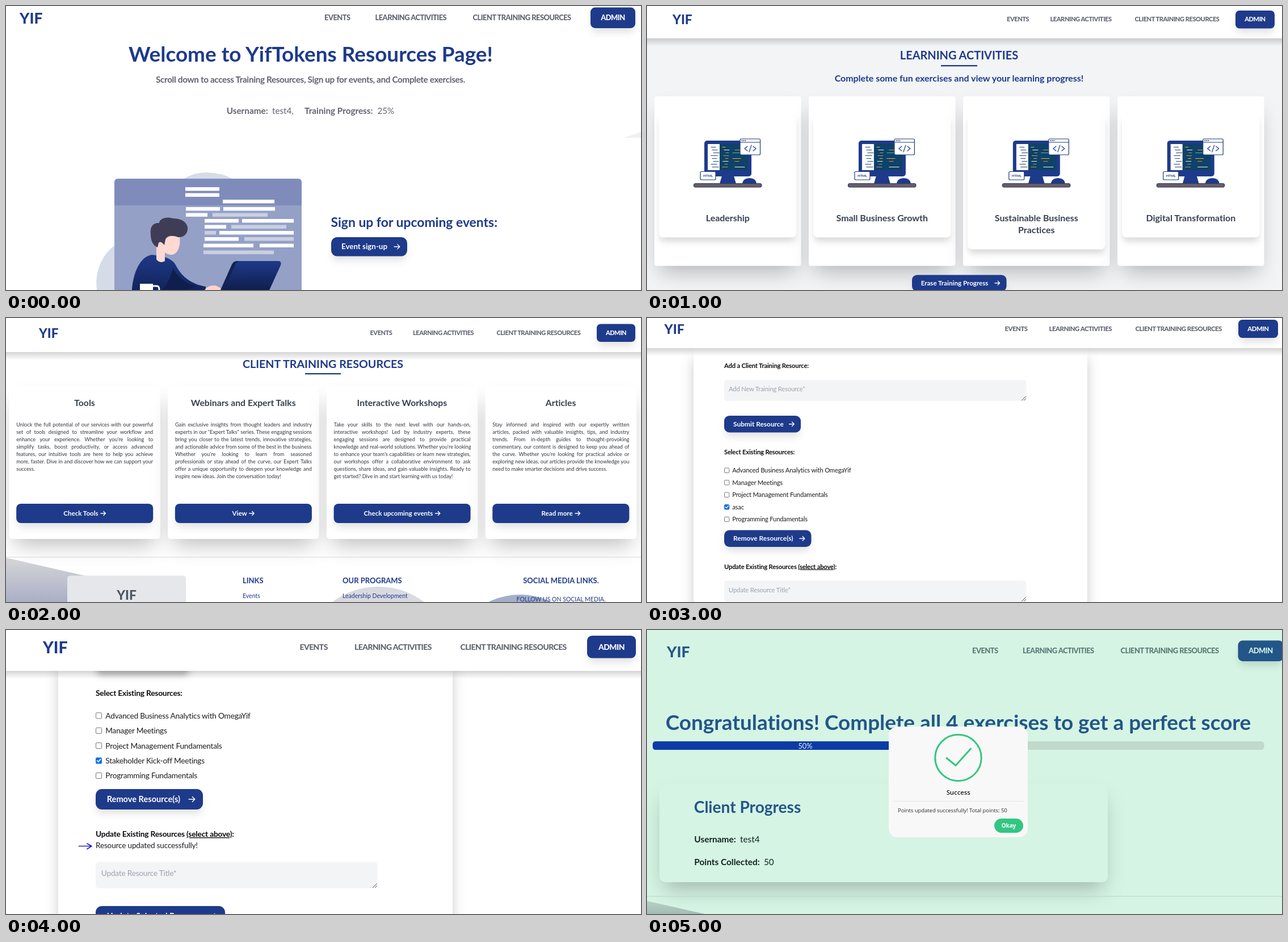
Recreate the animation shown at these times as an HTML page. Size 1119 px wide and 500 px high, loop 6 s.

```html
<!DOCTYPE html>
<html lang="en">
<head>
<meta charset="utf-8">
<title>Training portal tour</title>
<style>
html, body { margin: 0; width: 100%; height: 100%; overflow: hidden; background: #fff; }
svg { display: block; width: 100%; height: 100%; }
text, .copy { font-family: Lato, "Open Sans", sans-serif; font-variant-ligatures: none; }
.copy { color: #33363d; font-size: 9.2px; line-height: 13.07px; }
.copy div { white-space: nowrap; text-align: justify; text-align-last: justify; }
.copy div:last-child { text-align-last: left; }
</style>
</head>
<body>
<svg id="stage" viewBox="0 0 1119 500" preserveAspectRatio="none"></svg>
<script>
const NAVY = '#1e3a8a', GREY = '#60646f', INK = '#374151', BRAND = 'YIF', USER = 'test4';

const text = (x, y, str, size, o = {}) =>
  `<text x="${x}" y="${y}" font-size="${size}" font-weight="${o.w || 400}" fill="${o.fill || NAVY}"
    text-anchor="${o.mid ? 'middle' : 'start'}" letter-spacing="${(o.ls || 0) * size}"
    ${o.font ? `style="font-family:${o.font}"` : ''}>${str}</text>`;

const rect = (x, y, w, h, fill, r = 0, extra = '') =>
  `<rect x="${x}" y="${y}" width="${w}" height="${h}" rx="${r}" fill="${fill}" ${extra}/>`;

const path = (d, fill, extra = '') => `<path d="${d}" fill="${fill}" ${extra}/>`;

const line = (d, color, width, extra = '') =>
  path(d, 'none', `stroke="${color}" stroke-width="${width}" stroke-linecap="round" stroke-linejoin="round" ${extra}`);

const shadow = (x, y, w, h, dy, blur, inset, alpha) =>
  rect(x + inset, y + inset + dy, w - 2 * inset, h - 2 * inset, `rgba(0,0,0,${alpha})`, 6,
    `style="filter:blur(${blur}px)"`);

const box = (x, y, w, h, fill, r) => shadow(x, y, w, h, 20, 18, 9, 0.25) + rect(x, y, w, h, fill, r);

const arrow = (x, y, len, color = '#fff', width = 1.3) => {
  const h = len * 0.42;
  return line(`M${x} ${y}h${len}m${-h} ${-h}l${h} ${h}l${-h} ${h}`, color, width);
};

const pill = (x, y, w, h, r, fill = NAVY) =>
  shadow(x, y, w, h, 10, 7, 3, 0.12) + rect(x, y, w, h, fill, r);

// Button with a label on the left and an arrow after it
function button(x, y, w, h, label, size, arrowX) {
  return pill(x, y, w, h, h * 0.31) +
    text(x + size * 1.35, y + h / 2 + size * 0.35, label, size, { w: 700, fill: '#fff' }) +
    arrow(arrowX, y + h / 2, size * 0.74);
}

function nav({ size, y, xs, btn, logo, dark = NAVY, grey = GREY, label = '#fff' }) {
  const [bx, by, bw, bh] = btn;
  const style = { w: 800, fill: grey, ls: -0.04 };
  return text(logo[0], logo[1], BRAND, size * 2.05, { w: 800, fill: dark }) +
    ['EVENTS', 'LEARNING ACTIVITIES', 'CLIENT TRAINING RESOURCES']
      .map((s, i) => text(xs[i] - 0.5, y, s, size, style)).join('') +
    pill(bx, by, bw, bh, size * 0.63, dark) +
    text(bx + bw / 2, y, 'ADMIN', size, { ...style, fill: label, mid: true });
}

const header = (h, o) => rect(0, h, 1119, 14, 'url(#fade)') + rect(0, 0, 1119, h, '#fff') + nav(o);

function coder() {
  const bars = [
    [316, 319, 60], [316, 329.5, 60], [382, 341, 91], [317, 354, 60], [383, 354, 91],
    [317, 364.5, 38], [364, 364.5, 97, 1], [350, 375, 60], [416, 375, 91], [350, 385.5, 38],
    [397, 385.5, 97, 1], [350, 396, 20, 1], [376, 396, 131], [350, 407, 60], [420, 407, 87, 1],
    [348, 418.5, 88], [447, 418.5, 60], [348, 430.5, 124, 1]
  ];
  return path('M312 305Q330 293 354 293Q382 294 400 305ZM192 421C170 437 158 465 159.5 492L160 500H192Z', '#d6dbe8') +
    path('M191 500V311Q191 304 198 304H514Q521 304 521 311V500Z', '#94a0c6') +
    path('M191 351V311Q191 304 198 304H514Q521 304 521 311V351Z', '#7f8cbb') +
    bars.map(([x, y, w, dim]) => rect(x, y, w, 6.4, dim ? '#cad0e3' : '#fff')).join('') +
    path('M222 500C224 470 236 441 257 438C280 440 294 446 299 456C310 478 328 490 352 494V500Z', 'url(#shirt)') +
    path('M276 500Q290 482 294 462C306 482 320 490 336 493L318 500Z', '#0f1e4c') +
    path('M350 500Q356 491 368 492Q376 494 381 500Z', '#ffd3ca') +
    path('M279 408Q290 402 306 407C308 422 303 437 292 438Q285 438 280 434L280 449Q271 454 265 446L265 420Q272 412 279 420Z', '#ffd9d2') +
    path('M255 402C253 388 260 381 270 382C270 374 284 370 294 374C306 374 318 378 320 390C321 401 313 408 303 407C294 403 284 404 281 411L279 421Q272 412 269 417L267 425C258 421 255 412 255 402Z', '#3f3d56') +
    path('M378 500L398 455Q401 449 407 449H479Q486 449 484 456L464 500Z', '#122352') +
    path('M384 500L404 455Q407 449 412 449H479Q486 449 484 456L464 500Z', 'url(#lid)') +
    rect(236, 489, 23, 12, '#fff') + line('M259 493H266Q270 493 270 500', '#fff', 3);
}

function monitor() {
  const colors = ['#e3b04b', '#f4efe0', '#58b6a6', '#e58a4a'];
  let code = '';
  for (let i = 0; i < 8; i++) {
    const y = 248.5 + i * 5;
    code += line(`M${113 + (i % 3) * 2} ${y}h${8 + (i * 5) % 4}`, '#26466f', 1.2);
    code += line(`M${133 + (i * 3) % 7} ${y}h${5 + (i * 4) % 8}`, colors[i % 4], 1.2);
    if (i % 3) code += line(`M${151 + (i % 2) * 4} ${y}h${6 + (i * 5) % 12}`, colors[(i * 3) % 4], 1.2);
  }
  const edge = 'stroke="#1e3a7a" stroke-width="1.2"';
  return rect(101, 237, 83, 63, NAVY, 5) + rect(107, 243, 71, 46, '#0e4268') + rect(107, 243, 21, 46, '#fff') + code +
    path('M132 299H153L157 313H128Z', NAVY) +
    path('M168 313Q169 303 181 303Q192 303 193 313Z', NAVY) +
    rect(82.5, 312.5, 119.5, 6.5, '#6d5c60', 3.2, edge) +
    rect(164, 234, 35.5, 28, '#fff', 2, edge) + line('M164 240H199.5', NAVY, 1) +
    [167.5, 170.5, 173.5].map(x => `<circle cx="${x}" cy="237" r="1" fill="${NAVY}"/>`).join('') +
    line('M177 247l-5 4l5 4M187 247l5 4l-5 4M184 245l-4 12', NAVY, 1.2) +
    rect(94, 291.5, 27, 14.5, '#fff', 2, edge) +
    text(107.5, 301, 'HTML', 6, { w: 700, mid: true });
}

function welcome() {
  const b = { w: 700, fill: GREY }, r = { fill: GREY };
  return rect(0, 0, 1119, 500, '#fff') +
    nav({ size: 12.9, y: 24.6, xs: [561.5, 651, 823], btn: [1030, 2.5, 79, 36.5], logo: [24, 31] }) +
    text(537, 98, `Welcome to ${BRAND[0]}ifTokens Resources Page!`, 36.9, { w: 700, mid: true }) +
    text(536.5, 135, 'Scroll down to access Training Resources, Sign up for events, and Complete exercises.', 15.33,
      { ...b, mid: true, ls: -0.025 }) +
    text(388.7, 190, 'Username:', 15.3, b) + text(469, 190, USER + ',', 15.2, r) +
    text(526, 190, 'Training Progress:', 15.3, b) + text(654.5, 190, '25%', 15.2, r) +
    path('M1089 232L1119 222V232Z', '#f0f0f2') + coder() +
    text(572.5, 389, 'Sign up for upcoming events:', 22.9, { w: 700 }) +
    button(573, 407, 134, 33.5, 'Event sign-up', 13.35, 684);
}

function activities() {
  const names = [['Leadership'], ['Small Business Growth'], ['Sustainable Business', 'Practices'], ['Digital Transformation']];
  const cards = names.map((rows, i) => {
    const x = 13 + i * 272, h = rows.length > 1 ? 238.5 : 217.5;
    return box(x, 159, 258.5, 298.5, '#fff', 4) +
      shadow(x + 8, 190, 242.5, h, 9, 6, 2, 0.15) + rect(x + 6, 165, 246.5, 30, '#fff') +
      rect(x + 8, 185, 242.5, h + 5, '#fff', 8) +
      `<g transform="translate(${i * 271.9} 0)">${monitor()}</g>` +
      rows.map((s, k) => text(x + 129.3, 378.5 + k * 21, s, 15.95, { w: 700, fill: INK, mid: true })).join('');
  });
  return rect(0, 0, 1119, 500, '#f3f4f6') + cards.join('') +
    text(550, 94, 'LEARNING ACTIVITIES', 19.95, { w: 700, mid: true }) + rect(518, 104, 64, 2.3, NAVY) +
    text(550, 132.5, 'Complete some fun exercises and view your learning progress!', 15.95, { w: 700, mid: true }) +
    button(467, 473.5, 166.5, 28.5, 'Erase Training Progress', 11.6, 613) +
    header(57, { size: 11.1, y: 27, xs: [634.5, 711, 860], btn: [1037, 8, 69, 31.5], logo: [45, 32] });
}

const resourceCards = [
  ['Tools', 'Check Tools', `Unlock the full potential of our services with our powerful
set of tools designed to streamline your workflow and
enhance your experience. Whether you're looking to
simplify tasks, boost productivity, or access advanced
features, our intuitive tools are here to help you achieve
more, faster. Dive in and discover how we can support your
success.`],
  ['Webinars and Expert Talks', 'View', `Gain exclusive insights from thought leaders and industry
experts in our "Expert Talks" series. These engaging sessions
bring you closer to the latest trends, innovative strategies,
and actionable advice from some of the best in the business.
Whether you're looking to learn from seasoned
professionals or stay ahead of the curve, our Expert Talks
offer a unique opportunity to deepen your knowledge and
inspire new ideas. Join the conversation today!`],
  ['Interactive Workshops', 'Check upcoming events', `Take your skills to the next level with our hands-on,
interactive workshops! Led by industry experts, these
engaging sessions are designed to provide practical
knowledge and real-world solutions. Whether you're looking
to enhance your team's capabilities or learn new strategies,
our workshops offer a collaborative environment to ask
questions, share ideas, and gain valuable insights. Ready to
get started? Dive in and start learning with us today!`],
  ['Articles', 'Read more', `Stay informed and inspired with our expertly written
articles, packed with valuable insights, tips, and industry
trends. From in-depth guides to thought-provoking
commentary, our content is designed to keep you ahead of
the curve. Whether you're looking for practical advice or
exploring new ideas, our articles provide the knowledge you
need to make smarter decisions and drive success.`]
];

// Half widths of the button labels, used to seat the arrows
const labelHalf = [31, 13, 61, 28];

function resources() {
  const cards = resourceCards.map(([title, label, copy], i) => {
    const x = 5.5 + i * 279.7, mid = x + 133;
    const rows = copy.split('\n').map(s => `<div>${s}</div>`).join('');
    return box(x, 120, 266.5, 269, '#fff', 5) +
      text(mid, 154.5, title, 15.75, { w: 700, fill: INK, mid: true }) +
      `<foreignObject x="${x + 12.7}" y="180.5" width="241" height="120"><div class="copy">${rows}</div></foreignObject>` +
      pill(x + 12.7, 327, 241, 34, 8) +
      text(mid - 6.5, 348, label, 11.55, { w: 700, fill: '#fff', mid: true }) +
      arrow(mid - 6.5 + labelHalf[i] + 4, 344, 8.5);
  });
  return rect(0, 0, 1119, 500, '#fff') + cards.join('') +
    text(558.5, 87.5, 'CLIENT TRAINING RESOURCES', 19.7, { w: 700, mid: true }) + rect(527, 97, 63, 2.3, NAVY) +
    rect(0, 420.5, 1119, 1, '#d6d7da') +
    path('M0 422L140 454L317 500H0Z', 'url(#wedge)') +
    '<circle cx="656" cy="608" r="135" fill="#d9dae0"/><circle cx="906" cy="613" r="126" fill="#a5aec9"/>' +
    rect(108, 453.5, 209, 60, '#e5e7eb', 5) +
    text(212.5, 496, BRAND, 22.7, { w: 800, fill: '#4b5563', mid: true }) +
    text(417, 467, 'LINKS', 13, { w: 700 }) + text(593, 467, 'OUR PROGRAMS', 13, { w: 700 }) +
    text(978, 467, 'SOCIAL MEDIA LINKS.', 13, { w: 700, mid: true }) +
    text(417, 493, 'Events', 10.5) + text(593, 493, 'Leadership Development', 10.5) +
    text(978, 498.5, 'FOLLOW US ON SOCIAL MEDIA.', 10.5, { mid: true }) +
    header(60, { size: 11, y: 29.5, xs: [642, 717.5, 865], btn: [1041, 10.5, 68, 31.5], logo: [58, 35] });
}

const sheet = (x, w) => rect(0, 0, 1119, 500, '#fff') +
  rect(x, 72, w, 600, 'rgba(0,0,0,.2)', 0, 'style="filter:blur(11px)"') + rect(x, 0, w, 500, '#fff');

function checklist(x, y, step, size, labels) {
  const s = size * 0.74;
  return labels.map((label, i) => {
    const cy = y + i * step, top = cy - s / 2, on = i === 3;
    return rect(x + 0.5, top, s, s, on ? '#0b6fe4' : '#fff', 1.5, `stroke="${on ? '#0b6fe4' : '#767676'}" stroke-width="1"`) +
      (on ? line(`M${x + 0.5 + s * 0.2} ${cy}l${s * 0.22} ${s * 0.22}l${s * 0.4} ${-s * 0.48}`, '#fff', s * 0.17) : '') +
      text(x + size * 1.27, cy + size * 0.36, label, size, { fill: '#1b1c20', ls: -0.015 });
  }).join('');
}

const courses = pick => ['Advanced Business Analytics with OmegaYif', 'Manager Meetings',
  'Project Management Fundamentals', pick, 'Programming Fundamentals'];

const label = (x, y, str, size) => text(x, y, str, size, { w: 700, fill: '#0c0c0f', ls: -0.015 });
const updateLabel = 'Update Existing Resources <tspan text-decoration="underline">(select above)</tspan>:';

function field(x, y, w, h, hint, size) {
  const rx = x + w - 1, by = y + h - 1;
  return rect(x, y, w, h, '#f3f4f6', 5) +
    text(x + size * 0.72, y + size * 1.8, hint, size, { fill: '#9ca3af', ls: -0.015 }) +
    line(`M${rx - 7} ${by}l7 -7M${rx - 3} ${by}l3 -3`, '#4b4d52', 1);
}

function removeResource() {
  return sheet(82, 694) +
    label(136, 88, 'Add a Client Training Resource:', 11.2) +
    field(136, 109, 532.5, 37, 'Add New Training Resource*', 11.2) +
    button(136, 172, 135, 29.5, 'Submit Resource', 11.9, 250.5) +
    label(136, 240, 'Select Existing Resources:', 11.2) +
    checklist(136, 268.3, 21.5, 11.2, courses('asac')) +
    button(136, 373.5, 153.5, 29.5, 'Remove Resource(s)', 11.9, 269) +
    label(136, 441.5, updateLabel, 11.2) +
    field(136, 462.5, 532.5, 37, 'Update Resource Title*', 11.2) +
    header(53, { size: 11.35, y: 22.5, xs: [631, 709, 861], btn: [1042, 3, 70, 32], logo: [30.5, 28] });
}

function updateResource() {
  return sheet(92, 695) + shadow(158, 36, 166, 36, 10, 6, 2, 0.25) +
    label(158, 116, 'Select Existing Resources:', 13.75) +
    checklist(158, 150.8, 26.4, 13.65, courses('Stakeholder Kick-off Meetings')) +
    button(158, 280, 189, 36, 'Remove Resource(s)', 14.6, 322) +
    label(158, 364, updateLabel, 13.75) +
    text(158, 384, 'Resource updated successfully!', 13.65, { fill: '#1b1c20', ls: -0.015 }) +
    line('M128.5 380.5H150M143 376L151 380.5L143 385.5', '#2420cf', 1.7) +
    field(158, 408.5, 496.5, 46, 'Update Resource Title*', 13.65) +
    button(158, 486, 228, 36, 'Update Selected Resource', 14.6, 361) +
    header(72, { size: 13.95, y: 34.5, xs: [518, 614.5, 801], btn: [1024, 10, 86, 39.5], logo: [65, 40.5] });
}

function success() {
  const mint = '#d5f4e4', dark = '#225689', ink = '#10241d', green = '#32c682', sans = "'Open Sans',sans-serif";
  return rect(0, 0, 1119, 500, mint) +
    nav({ size: 12.9, y: 41, xs: [573.5, 662.5, 835], btn: [1041.5, 18.5, 80, 36.5], logo: [35, 47.5],
      dark, grey: '#577a74', label: mint }) +
    text(548.5, 176, 'Congratulations! Complete all 4 exercises to get a perfect score', 36.9, { w: 700, fill: dark, mid: true }) +
    rect(10, 196, 1077.5, 15, '#bfdacc', 5.5) + path('M548 196H15.5Q10 196 10 201.5V205.5Q10 211 15.5 211H548Z', '#0d3ba6') +
    text(279, 208.5, '50%', 12.8, { fill: '#e4f4f4', mid: true }) +
    box(22, 270, 790, 174, mint, 10) +
    text(82.8, 322, 'Client Progress', 28.1, { w: 700, fill: dark }) +
    text(83.3, 374, 'Username:', 15.4, { w: 700, fill: ink }) + text(164, 374, USER, 15.3, { fill: ink }) +
    text(83.3, 413.5, 'Points Collected:', 15.4, { w: 700, fill: ink }) + text(206, 413.5, '50', 15.3, { fill: ink }) +
    rect(0, 468.5, 1119, 1, '#b9d3c6') + path('M0 477L102 500H0Z', 'url(#moss)') +
    rect(426, 170, 245, 195, '#f8f8f8', 15) +
    `<circle cx="548.5" cy="225" r="40.7" fill="none" stroke="${green}" stroke-width="3"/>` +
    line('M528 225.5L544 238.5L570.5 209', green, 3) +
    text(548.7, 289.5, 'Success', 11.3, { w: 600, fill: '#1e1e1e', mid: true, font: sans }) +
    rect(434, 301, 229, 1, '#e4e4e4') +
    text(442, 320.5, 'Points updated successfully! Total points: 50', 9.42, { fill: '#2b2b2b', font: sans }) +
    rect(612, 332, 51, 25, green, 12.5) +
    text(637.5, 348, 'Okay', 9.8, { w: 700, fill: '#fff', mid: true, font: sans });
}

const gradient = (id, dir, from, to) =>
  `<linearGradient id="${id}" ${dir}><stop stop-color="${from}"/><stop offset="1" stop-color="${to}"/></linearGradient>`;
const down = 'x2="0" y2="1"';

const scenes = [welcome, activities, resources, removeResource, updateResource, success];
const stage = document.getElementById('stage');
stage.innerHTML = '<defs>' +
  gradient('fade', down, 'rgba(0,0,0,.17)', 'rgba(0,0,0,0)') +
  gradient('shirt', down, NAVY, '#12245a') +
  gradient('lid', down, NAVY, '#101e4c') +
  gradient('wedge', down, '#d6d6d8', '#a9afc6') +
  gradient('moss', down, '#b9cfc5', '#a2bdb4') +
  '</defs>' + scenes.map(draw => `<g class="scene">${draw()}</g>`).join('');

const groups = [...stage.querySelectorAll('.scene')];
const start = performance.now();

function render(now) {
  const current = Math.floor(Math.max(0, now - start) % 6000 / 1000);
  groups.forEach((g, i) => { g.style.display = i === current ? '' : 'none'; });
  requestAnimationFrame(render);
}
render(start);
</script>
</body>
</html>
```
